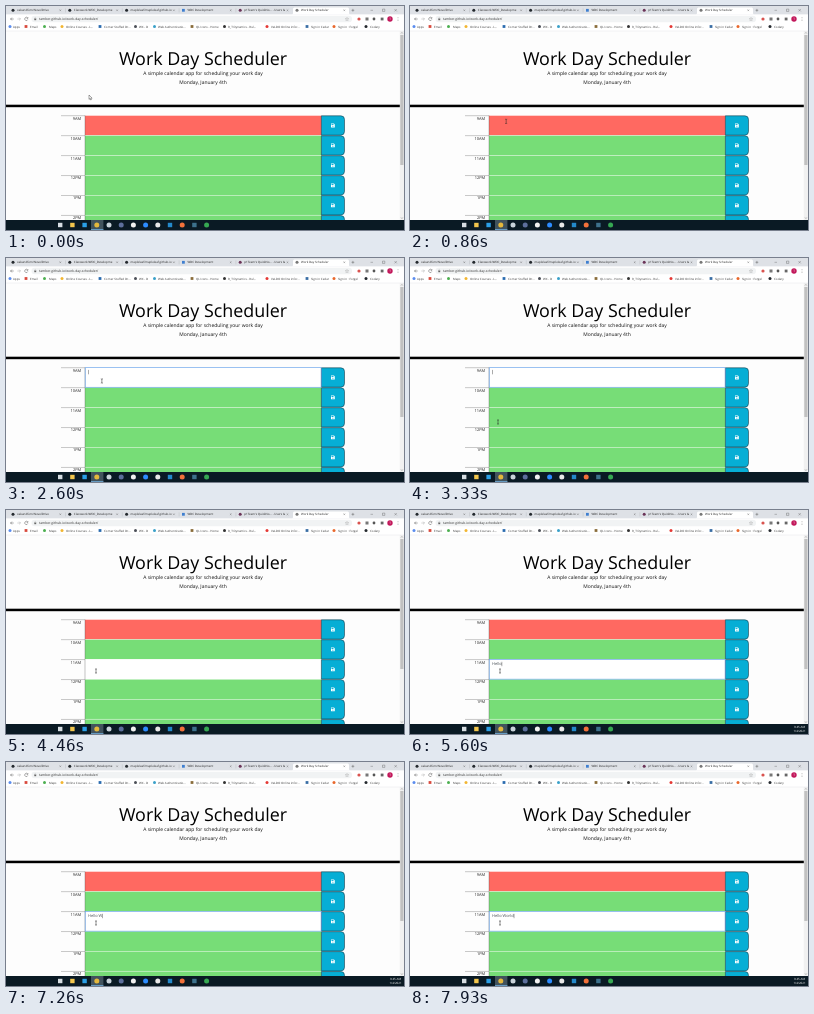
Write an HTML page that moves like this. It is 398 by 224 pixels and loops after 8 s.

```html
<!DOCTYPE html>
<html lang="en">
<head>
<meta charset="utf-8">
<title>Work Day Scheduler</title>
<style>
  html, body { margin: 0; width: 100%; height: 100%; overflow: hidden; background: #fdfdfd; }
  svg { display: block; width: 100vw; height: 100vh; }
  text { font-family: "Open Sans", sans-serif; text-rendering: geometricPrecision; white-space: pre; }
</style>
</head>
<body>
<svg id="stage" viewBox="0 0 398 224"></svg>
<script>
const LOOP = 8000, ROW_TOP = 109.5, ROW_H = 19.95;
const RED = '#ff6961', GREEN = '#77dd77';
const stage = document.getElementById('stage');

function add(tag, attrs, content) {
  const el = document.createElementNS('http://www.w3.org/2000/svg', tag);
  for (const k in attrs) el.setAttribute(k, attrs[k]);
  if (content !== undefined) el.textContent = content;
  return stage.appendChild(el);
}
const rect = (x, y, width, height, fill, more) => add('rect', { x, y, width, height, fill, ...more });
const circle = (cx, cy, r, fill) => add('circle', { cx, cy, r, fill });
const path = (d, stroke, width = .5, fill = 'none') =>
  add('path', { d, stroke, fill, 'stroke-width': width });
const label = (x, y, size, str, fill = '#222', more) =>
  add('text', { x, y, 'font-size': size, fill, ...more }, str);
const centred = { 'text-anchor': 'middle' };

// Page header
rect(0, 0, 398, 224, '#fdfdfd');
label(197, 59, 17.9, 'Work Day Scheduler', '#000', centred);
label(197, 69.2, 4.97, 'A simple calendar app for scheduling your work day', '#111', centred);
label(197, 78.2, 4.97, 'Monday, January 4th', '#111', centred);
rect(0, 98.7, 394, 2.5, '#000');

// Time blocks
const rowY = i => ROW_TOP + i * ROW_H;
const blocks = ['9AM', '10AM', '11AM', '12PM', '1PM', '2PM'].map((hour, i) => {
  const y = rowY(i);
  path(`M55 ${y + .2}H79`, '#777', .4);
  label(75.2, y + 4.1, 3.98, hour, '#222', { 'text-anchor': 'end' });
  const block = rect(79, y + .2, 236.5, ROW_H - .5, i ? GREEN : RED);
  path(`M79 ${y}V${y + ROW_H}`, '#555', .35);
  path(`M315.4 ${y + .3}h19.4q3.7 0 3.7 3.7v${ROW_H - 8}q0 3.7-3.7 3.7h-19.4z`, '#16323d', .55, '#06aed5');
  const cy = y + 10;
  path(`M325 ${cy - 1.9}h2.9l.9.9v2.9h-3.8z`, 'none', 0, '#fff');
  rect(325.5, cy - 1.4, 2, 1, '#06aed5');
  circle(326.9, cy + .7, .55, '#06aed5');
  return block;
});

// Scrollbar
rect(393.8, 25, 4.2, 189, '#f1f1f1');
rect(394.3, 29, 3.2, 130, '#c1c1c1');
path('M395 27.5l.9-1 .9 1', '#555', .4);
path('M395 211.5l.9 1 .9-1', '#555', .4);

// Browser tabs
rect(0, 0, 398, 8.6, '#dee1e6');
path('M285.5 8.6q1.5 0 1.5-1.5V3q0-1.5 1.5-1.5h53q1.5 0 1.5 1.5v4.1q0 1.5 1.5 1.5z', 'none', 0, '#fff');
[
  ['#24292e', 'oakandfern/NovelDrive'],
  ['#24292e', 'Classwork/WDC_Developme'],
  ['#24292e', 'mapleleaf/mapleleaf.github.io'],
  ['#3f7fd0', 'WDC Development'],
  ['#6b3458', 'p1Team\'s QuickNo… - Users &'],
  ['#777', 'Work Day Scheduler']
].forEach(([colour, title], i) => {
  const x = 7 + i * 56.8;
  if (i === 3) rect(x - 1.4, 2.9, 2.8, 2.8, colour); else circle(x, 4.3, 1.5, colour);
  label(x + 4, 5.4, 2.95, title);
  path(`M${x + 46.5} 3.5l1.6 1.6m0-1.6l-1.6 1.6`, '#555', .35);
  if (i < 4) path(`M${x + 52.5} 2.4V6.4`, '#9a9da2', .25);
});
path('M345.5 4.3h2.8m-1.4-1.4v2.8', '#444', .4);
path('M364.5 4.3h2.5M376.5 3.1h2.3v2.3h-2.3zM388.5 3.1l2.3 2.3m0-2.3l-2.3 2.3', '#333', .3);

// Address bar
rect(0, 8.6, 398, 16.4, '#fff');
path('M7.7 13H4.5m1.4-1.4L4.5 13l1.4 1.4', '#555', .5);
path('M11.3 13h3.2m-1.4-1.4l1.4 1.4-1.4 1.4', '#aaa', .5);
path('M21.6 12a1.6 1.6 0 1 0 .2 1.5m.1-2.4v1.2h-1.3', '#555', .5);
rect(25.5, 9.8, 320.5, 6.5, '#f1f3f4', { rx: 3.2 });
rect(28.3, 12.6, 1.9, 1.6, '#666');
path('M28.7 12.7v-.6q.55-1.1 1.1 0v.6', '#666', .3);
label(33, 14.2, 3.35, 'tamber.github.io/work-day-scheduler/', '#333');
path('M341 11.4l.5 1.1 1.2.1-.9.8.3 1.2-1.1-.6-1.1.6.3-1.2-.9-.8 1.2-.1z', '#777', .25);
circle(353, 13, 1.6, '#d9534f');
rect(359.5, 11.5, 3, 3, '#777');
circle(368, 13, 1.4, '#555');
rect(374.7, 11.6, 2.8, 2.8, '#666');
circle(384, 13, 2.7, '#c2185b');
label(384, 14.1, 3, 'T', '#fff', centred);
[11.6, 13, 14.4].forEach(y => circle(392, y, .35, '#555'));

// Bookmarks
[
  [4, '#5b8def', 'Apps', 7],
  [20, '#d94a3d', 'Email', 24],
  [38.5, '#4caf50', 'Maps', 43],
  [56, '#f2b632', 'Online Courses - L…', 60],
  [94, '#2b6cb0', 'Corner Stuffed Dr…', 98],
  [129.5, '#4b4f57', 'WX - D', 133],
  [148.5, '#3aa0c9', 'Web Authenticatio…', 152],
  [186, '#8a6d3b', 'QL Icons - Home', 190],
  [218.5, '#333', 'R_T Dynamics - Rul…', 222],
  [261, '#e53935', 'VeLDO Online infor…', 265],
  [301, '#3a6ea5', 'Sign in Cedar', 305],
  [328, '#e9682c', 'Sign in · Forgel', 332],
  [360, '#24292e', 'Codary', 364]
].forEach(([x, colour, name, tx], i) => {
  if (i % 3 === 1) rect(x - 1.4, 19.1, 2.8, 2.8, colour); else circle(x, 20.5, 1.5, colour);
  label(tx, 21.6, 2.95, name, '#333');
});
path('M0 25H398', '#d5d7da', .3);

// Taskbar
rect(0, 214, 398, 10, '#0a1a24');
rect(85, 214, 12.4, 10, '#42535d');
rect(85, 223.3, 12.4, .7, '#76b9ed');
['#d6dde2', '#f3c64d', '#2b9fe6', '#e4b83c', '#c9d3da', '#5d6f9c', '#f1f1f1',
 '#2d8cff', '#e8e8e8', '#2489ca', '#f2713a', '#3d718c', '#36a852'].forEach((colour, i) => {
  const x = 54.2 + i * 12.2;
  if ([0, 1, 2, 9, 11].includes(i)) rect(x - 2.2, 216.8, 4.4, 4.4, colour);
  else circle(x, 219, 2.5, colour);
});
const clock = [
  label(389.5, 218.2, 2.95, '9:45 AM', '#fff', centred),
  label(389.5, 222.3, 2.95, '1/4/2021', '#fff', centred)
];

// Moving parts
const outline = rect(79.2, 0, 236, ROW_H - .4, 'none', { stroke: '#5a9bea', 'stroke-width': .6 });
const note = label(82, rowY(2) + 5.9, 3.98, '', '#495057');
const caret = rect(82, 0, .35, 4.4, '#111');
const arrow = path('M0 0V4.4L1 3.5L1.7 5L2.4 4.7L1.7 3.2H3.1Z', '#222', .4, '#fff');
const beam = path('M-1-2.2Q0-2.2 0-1.7Q0-2.2 1-2.2M0-1.8V1.8M-1 2.2Q0 2.2 0 1.7Q0 2.2 1 2.2', '#222', .5);

const moves = [[60, 83, 89], [1000, 97, 117], [2400, 97, 117], [3300, 88, 164], [3460, 88, 164], [4060, 90, 161]];
const typing = [
  [4900, 'H'], [5030, 'He'], [5160, 'Hel'], [5290, 'Hell'], [5400, 'Hello'],
  [6000, 'Hellow'], [6700, 'Hello'], [6950, 'Hello '], [7150, 'Hello W'],
  [7300, 'Hello Wo'], [7450, 'Hello Wor'], [7600, 'Hello Worl'], [7800, 'Hello World']
];
const FIRST_CLICK = 1200, SECOND_CLICK = 4400, RING_ON = 4500, CLOCK_ON = 5200;

function pointer(t) {
  const next = moves.findIndex(m => m[0] > t);
  if (next < 1) return (next ? moves[moves.length - 1] : moves[0]).slice(1);
  const [t0, x0, y0] = moves[next - 1], [t1, x1, y1] = moves[next];
  const p = (t - t0) / (t1 - t0), e = p * p * (3 - 2 * p);
  return [x0 + (x1 - x0) * e, y0 + (y1 - y0) * e];
}
const show = (el, on) => el.setAttribute('visibility', on ? 'visible' : 'hidden');

function draw(t) {
  const focus = t < FIRST_CLICK ? -1 : t < SECOND_CLICK ? 0 : 2;
  const ringed = focus === 0 || t >= RING_ON;
  blocks.forEach((b, i) => b.setAttribute('fill', i === focus ? '#fff' : i ? GREEN : RED));
  show(outline, focus >= 0 && ringed);
  if (focus >= 0) outline.setAttribute('y', rowY(focus) + .2);

  const typed = typing.filter(k => k[0] <= t).pop();
  note.textContent = typed ? typed[1] : '';
  const since = t - (typed ? typed[0] : focus ? RING_ON : FIRST_CLICK);
  show(caret, focus >= 0 && ringed && since % 1060 < 530);
  if (focus >= 0) {
    caret.setAttribute('x', 82 + (typed ? note.getComputedTextLength() + .2 : 0));
    caret.setAttribute('y', rowY(focus) + 2.4);
  }

  const [x, y] = pointer(t), inText = y > ROW_TOP;
  show(arrow, !inText);
  show(beam, inText);
  (inText ? beam : arrow).setAttribute('transform', `translate(${x} ${y})`);
  clock.forEach(el => show(el, t >= CLOCK_ON));
}

const start = performance.now();
function tick() {
  draw((performance.now() - start) % LOOP);
  requestAnimationFrame(tick);
}
tick();
</script>
</body>
</html>
```
